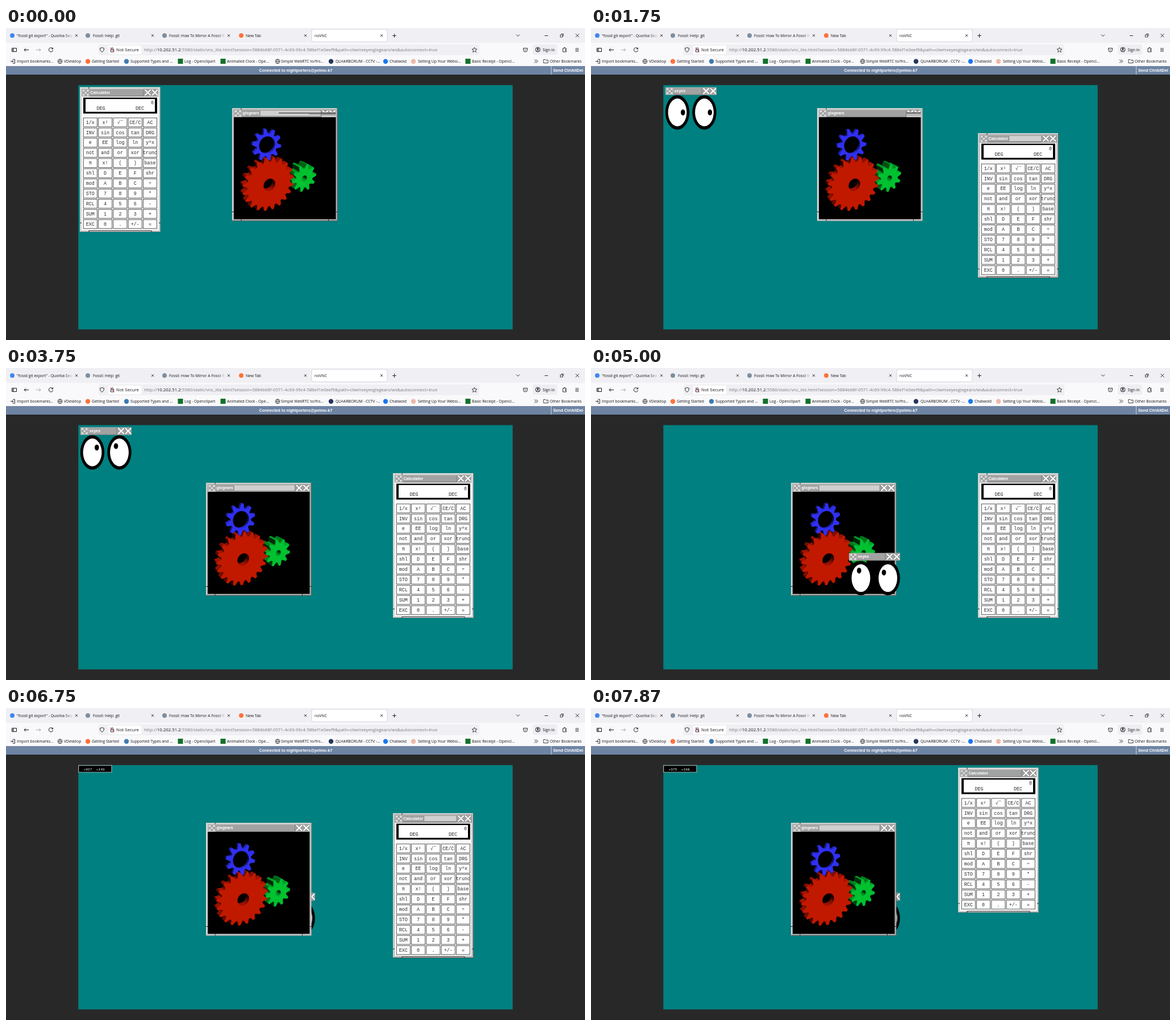
Recreate the animation shown at these times as an HTML page with a canvas. Size 1019 by 549 pixels, loop 8 s.

```html
<!DOCTYPE html>
<html lang="en">
<head>
<meta charset="utf-8">
<title>Remote desktop</title>
<style>
  html, body { margin: 0; width: 100%; height: 100%; overflow: hidden; background: #282828; }
  canvas { display: block; }
</style>
</head>
<body>
<canvas id="stage" width="1019" height="549"></canvas>
<script>
const ctx = document.getElementById('stage').getContext('2d');
const UI = '"Open Sans", "Noto Sans", sans-serif';
const ARIAL = '"Liberation Sans", Arial, sans-serif';
const MONO = '"Liberation Mono", monospace';
const INK = '#15141a';

// ---------- drawing helpers ----------
function box(x, y, w, h, color) {
  ctx.fillStyle = color;
  ctx.fillRect(x, y, w, h);
}
function rounded(x, y, w, h, r, color) {
  ctx.fillStyle = color;
  ctx.beginPath();
  ctx.roundRect(x, y, w, h, r);
  ctx.fill();
}
function oval(x, y, rx, ry, color) {
  ctx.fillStyle = color;
  ctx.beginPath();
  ctx.ellipse(x, y, rx, ry, 0, 0, 7);
  ctx.fill();
}
const disc = (x, y, r, color) => oval(x, y, r, r, color);
function draw(path, color = INK, width = 1, x = 0, y = 0) {
  ctx.save();
  ctx.translate(x, y);
  ctx.strokeStyle = color;
  ctx.lineWidth = width;
  ctx.stroke(new Path2D(path));
  ctx.restore();
}
function text(s, x, y, size, color = INK, font = UI, align = 'left', weight = '') {
  ctx.font = `${weight} ${size}px ${font}`;
  ctx.fillStyle = color;
  ctx.textAlign = align;
  ctx.fillText(s, x, y);
  return ctx.measureText(s).width;
}
function clipped(x, y, w, h, paint) {
  ctx.save();
  ctx.beginPath();
  ctx.rect(x, y, w, h);
  ctx.clip();
  paint();
  ctx.restore();
}
function lerpKeys(keys, k) {
  let i = 1;
  while (i < keys.length - 1 && keys[i][0] < k) i++;
  const [a, b] = [keys[i - 1], keys[i]];
  const p = Math.min(1, Math.max(0, (k - a[0]) / (b[0] - a[0])));
  return a.slice(1).map((v, j) => v + (b[j + 1] - v) * p);
}

// ---------- browser ----------
const CROSS = 'M-2,-2 L2,2 M2,-2 L-2,2';
const TABS = [
  [11, 19, 124, '"fossil git export" - Quorba Search', '#4285f4'],
  [144, 153, 258, 'Fossil: Help: git', '#7d8fa0'],
  [279, 287, 392, 'Fossil: How To Mirror A Fossil Repo', '#7d8fa0'],
  [414, 422, 527, 'New Tab', '#ff7139'],
  [0, 543, 661, 'noVNC']
];
const BOOKMARKS = [
  [12, 19, 'Import bookmarks...', 'import'], [95, 102, 'VDesktop', 'globe'],
  [144, 151, 'Getting Started', '#ff7139'], [212, 219, 'Supported Types and ...', '#3d7ab0'],
  [307, 314, 'Log - Openclipart', 'square'], [382, 389, 'Animated Clock - Ope...', 'square'],
  [478, 484, 'Simple WebRTC to/fro...', 'globe'], [572, 580, 'QLHARBORUM - CCTV -...', '#27365c'],
  [668, 675, 'Chatwold', '#1877f2'], [717, 725, 'Setting Up Your Websi...', '#f0b8a8'],
  [813, 820, 'Basic Receipt - Opencl...', 'square']
];

function drawTabs() {
  box(0, 0, 1019, 26, '#f0f0f4');
  rounded(537.5, 2, 134, 22.5, 3, '#d4d4dc');
  rounded(538.5, 2.8, 132, 21, 2.5, '#fff');
  for (const [icon, x, close, label, color] of TABS) {
    if (color) disc(icon, 13.3, 4, color);
    clipped(x, 0, close - 6 - x, 26, () => {
      text(label, x, 16, 6.8);
      if (label.length <= 25) return;
      const fade = ctx.createLinearGradient(close - 20, 0, close - 6, 0);
      fade.addColorStop(0, '#f0f0f400');
      fade.addColorStop(1, '#f0f0f4');
      box(close - 20, 4, 14, 18, fade);
    });
    draw(CROSS, INK, .9, close, 13.3);
  }
  draw('M-3.5,0 H3.5 M0,-3.5 V3.5', INK, .9, 683.5, 13.5);
  draw('M-3,-1.5 L0,1.5 L3,-1.5', INK, .9, 901, 13);
  draw('M-3,0 H3', INK, .9, 951, 13.5);
  draw('M-2.5,-1 H1.5 V3 H-2.5 Z M-1,-2.5 H3 V1.5', INK, .8, 978, 13);
  draw('M-3,-3 L3,3 M3,-3 L-3,3', INK, .9, 1005.5, 13.3);
}

function drawToolbar() {
  box(0, 26, 1019, 41, '#f9f9fb');
  draw('M-4,-3 H4 V3 H-4 Z M-1.5,-3 V3 M-3.5,0 H-1.5', INK, 1, 14.5, 38.5);
  draw('M4,0 H-4 M-1,-3 L-4,0 L-1,3', INK, 1, 36, 38.5);
  draw('M-4,0 H4 M1,-3 L4,0 L1,3', '#aaaab0', 1, 57, 38.5);
  draw('M3,-2.4 A3.7,3.7 0 1 0 3.7,.6 M3.6,-4 V-1.6 H1', INK, 1, 79, 38.5);
  rounded(163, 29, 670, 19, 3, '#f0f0f4');
  draw('M0,-4 L3.6,-2.8 Q3.8,2 0,4 Q-3.8,2 -3.6,-2.8 Z', INK, .9, 169, 38.5);
  rounded(180, 31, 58, 15, 2.5, '#fff');
  draw('M-2.6,-.5 H2.6 V3.5 H-2.6 Z M-1.7,-.5 V-2 A1.7,1.7 0 0 1 1.7,-2 V-.5', INK, .9, 187, 38.5);
  draw('M-3.5,-4 L3.5,4', '#d7264c', 1, 187, 38.5);
  text('Not Secure', 194, 41.4, 7.8);
  let x = 243;
  for (const [part, color] of [['http://', '#77777e'], ['10.202.51.2', INK],
    [':5580/static/vnc_lite.html?session=5884b68f-0571-4c69-99c4-586ef1e0eef9&path=ctwmxeyesglxgears/ws&autoconnect=true', '#77777e']])
    x += text(part, x, 41.4, 7.8, color);
  draw('M0,-4.5 L1.3,-1.5 L4.5,-1.3 L2,.8 L2.8,4 L0,2.2 L-2.8,4 L-2,.8 L-4.5,-1.3 L-1.3,-1.5 Z', INK, .8, 824.5, 38.5);
  draw('M-3.5,-3 H3.5 V0 A3.5,3.5 0 0 1 -3.5,0 Z M-1.8,-1 L0,.8 L1.8,-1', INK, .9, 914, 38.5);
  rounded(927, 29, 43, 18, 3, '#ededf2');
  draw('M-4,0 A4,4 0 1 0 4,0 A4,4 0 1 0 -4,0 M-2.5,3 Q0,-.5 2.5,3', INK, .9, 936, 38);
  disc(936, 36.8, 1.6, INK);
  text('Sign in', 944.5, 41, 6.9);
  draw('M-3,-2 H-1 V-3.5 H1 V-2 H3 V0 H1.5 V1.5 H3 V4 H-3 Z', INK, .9, 983, 38);
  draw('M-3,-2.5 H3 M-3,0 H3 M-3,2.5 H3', INK, .9, 1005, 38.5);
}

function drawBookmarks() {
  for (const [icon, x, label, kind] of BOOKMARKS) {
    if (kind === 'import') draw('M-4,0 H1 M-1,-2 L1,0 L-1,2 M0,-3.5 H3.5 V3.5 H0', INK, .9, icon, 58.7);
    else if (kind === 'globe') draw('M-4,0 A4,4 0 1 0 4,0 A4,4 0 1 0 -4,0 H4 M0,-4 Q-3.5,0 0,4 Q3.5,0 0,-4', '#333', .8, icon, 58.7);
    else if (kind === 'square') box(icon - 4.5, 54, 9, 9, '#12702a');
    else disc(icon, 58.7, 4.2, kind);
    text(label, x, 61.2, 6.8);
  }
  draw('M-3,-3 L0,0 L-3,3 M0,-3 L3,0 L0,3', INK, .9, 933, 58.5);
  draw('M-4,3 V-3 H-1 L0,-2 H4 V3 Z', INK, .8, 950, 58.5);
  text('Other Bookmarks', 957, 61.2, 6.8);
}

function drawPage() {
  box(0, 67, 1019, 15, '#6e84a3');
  text('Connected to nightporters@pelmo-k7', 510, 77.3, 7.2, '#fff', ARIAL, 'center', 'bold');
  box(959, 67, 1, 15, '#c8d2e0');
  text('Send CtrlAltDel', 963, 77.3, 7.2, '#fff', ARIAL, 'left', 'bold');
  box(0, 82, 1019, 467, '#282828');
  box(127.3, 100.5, 764.4, 429.8, '#008080');
}

// ---------- window decorations ----------
function titleButtons(x, y) {
  for (const dx of [6.5, 19]) for (const [color, width] of [['#777', 3.6], ['#fff', 2.4]])
    draw('M-5,-5 L5,5 M5,-5 L-5,5', color, width, x + dx, y + 6.5);
}
function titleBar(x, y, w, title, focused, torn) {
  box(x, y, w, 13.5, '#b4b4b4');
  for (let i = 0; i < 9; i++)
    box(x + 2.5 + (i % 3) * 3.6, y + 2 + Math.floor(i / 3) * 3.6, 2.4, 2.4, i % 2 ? '#999' : '#eee');
  const end = x + w - 25;
  box(x + 14, y + 1, end - x - 15, 11.5, '#a2a2a2');
  draw(`M${x + 14},${y + 12.8} H${end - 1} V${y + 1}`, '#686868', .8);
  const width = text(title, x + 15.5, y + 8.9, 7.1, '#fff', ARIAL, 'left', 'bold');
  if (focused) {
    box(x + 17 + width, y + 2, end - x - 18.5 - width, 9, '#d0d0d0');
    draw(`M${x + 17 + width},${y + 11} V${y + 2}`, '#777', .7);
  }
  box(end, y, 25, 13.5, '#a2a2a2');
  clipped(end, y, 25, torn ? 5 : 13.5, () => titleButtons(end, y));
  if (torn) {
    box(end, y + 5, 25, 8.5, '#c8c8c8');
    box(end, y + 5.5, 25, 1.2, '#222');
    box(end, y + 9, 25, .8, '#888');
  }
}
function frame(x, y, w, h, focused) {
  const [fill, bevel, edge] = focused ? ['#a0a0a0', '#d8d8d8', '#555'] : ['#e6e6e6', '#c4c4c4', '#8c8c8c'];
  box(x, y, w, h, fill);
  draw(`M${x + .5},${y + h} V${y + .5} H${x + w}`, '#dcdcdc');
  draw(`M${x + 1.8},${y + 1.8} H${x + w - 1.8} V${y + h - 1.8} H${x + 1.8} Z`, bevel);
  draw(`M${x + w - .5},${y} V${y + h - .5} H${x}`, edge);
  draw(`M${x + 16},${y} v3 M${x + 16},${y + h} v-3 M${x + w - 16},${y + h} v-3 M${x},${y + h - 16} h3 M${x + w},${y + h - 16} h-3`, '#222');
}

// ---------- calculator ----------
const KEYS = ['1/x x² √‾ CE/C AC', 'INV sin cos tan DRG', 'e EE log ln y^x', 'not and or xor trunc',
  'π x! ( ) base', 'shl D E F shr', 'mod A B C ÷', 'STO 7 8 9 *', 'RCL 4 5 6 -', 'SUM 1 2 3 +', 'EXC 0 . +/- ='];

function drawCalculator({ x, y }, focused) {
  frame(x, y, 142, 255, focused);
  titleBar(x + 3, y + 3, 135, 'Calculator', focused);
  box(x + 3, y + 17, 135.5, 234.5, '#fafafa');
  box(x + 6, y + 18.5, 130, 28, '#000');
  box(x + 10, y + 21, 122, 22.5, '#fff');
  const label = (s, cx, cy) => text(s, cx, cy + 2.6, 8.4, '#2a2a2a', MONO, 'center');
  label('0', x + 127.5, y + 27);
  label('DEG', x + 37, y + 37.5);
  label('DEC', x + 105.5, y + 37.5);
  KEYS.forEach((row, r) => row.split(' ').forEach((key, c) => {
    const cx = x + 18.3 + c * 26.3, cy = y + 62 + r * 17.9;
    box(cx - 12.5, cy - 8.3, 25, 16.6, '#444');
    box(cx - 11.6, cy - 7.4, 23.2, 14.8, '#fff');
    clipped(cx - 12.5, cy - 8, 25, 16, () => label(key, cx, cy));
  }));
  draw(`M${x + 16},${y + 252.5} H${x + 125}`, '#444');
}

// ---------- gears ----------
const RAD = Math.PI / 180;
const [CX, SX, CY, SY] = [Math.cos(20 * RAD), Math.sin(20 * RAD), Math.cos(30 * RAD), Math.sin(30 * RAD)];
const SLABS = [-1, -.5, -.25, .25, .5, 1];

function rotate([x, y, z]) {
  const depth = z * CY - x * SY;
  return [x * CY + z * SY, y * CX - depth * SX, y * SX + depth * CX];
}
function shade(rgb, normal) {
  const [x, y, z] = rotate(normal);
  const light = .2 + Math.max(0, (x + y + 2 * z) / Math.sqrt(6));
  return `rgb(${rgb.map(v => Math.min(255, v * light))})`;
}
function gear(x, y, inner, outer, half, teeth, rgb, turn) {
  const step = 90 / teeth, rim = [], hole = [];
  const at = (r, deg) => [x + r * Math.cos(deg * RAD), y + r * Math.sin(deg * RAD)];
  for (let i = 0; i < teeth; i++) {
    const a = turn + i * 4 * step;
    rim.push(at(outer - .35, a), at(outer + .35, a + step), at(outer + .35, a + 2 * step), at(outer - .35, a + 3 * step));
    hole.unshift(at(inner, a), at(inner, a - 2 * step));
  }
  const walls = [];
  for (const loop of [rim, hole]) loop.forEach((p, i) => {
    const q = loop[(i + 1) % loop.length];
    const len = Math.hypot(q[0] - p[0], q[1] - p[1]);
    const normal = [(q[1] - p[1]) / len, (p[0] - q[0]) / len, 0];
    if (rotate(normal)[2] > 0)
      walls.push({ p, q, color: shade(rgb, normal), near: rotate([...p, 0])[2] + rotate([...q, 0])[2] });
  });
  walls.sort((a, b) => a.near - b.near);
  return { rim, hole, half, walls, face: shade(rgb, [0, 0, 1]) };
}
function drawGears(cx, cy, angle) {
  const gears = [
    gear(3.1, -2, .5, 2, 1, 10, [0, 204, 51], -2 * angle - 9),
    gear(-3, -2, 1, 4, .5, 20, [204, 26, 0], angle),
    gear(-3.1, 4.2, 1.3, 2, .25, 10, [51, 51, 255], -2 * angle - 25)
  ];
  const fillLoops = (loops, color) => {
    ctx.beginPath();
    for (const loop of loops) {
      loop.forEach((point, i) => {
        const [x, y, z] = rotate(point), scale = 5 * 89.5 / (40 - z);
        ctx[i ? 'lineTo' : 'moveTo'](cx + x * scale, cy - y * scale);
      });
      ctx.closePath();
    }
    ctx.fillStyle = ctx.strokeStyle = color;
    ctx.lineWidth = .3;
    ctx.fill('evenodd');
    ctx.stroke();
  };
  // Paint slab by slab, from the back plane to the front one.
  for (let i = 1; i < SLABS.length; i++) {
    const [z0, z1] = [SLABS[i - 1], SLABS[i]];
    const present = gears.filter(g => g.half >= z1 && -g.half <= z0);
    for (const g of present) for (const { p, q, color } of g.walls)
      fillLoops([[[...p, z0], [...q, z0], [...q, z1], [...p, z1]]], color);
    for (const g of present) if (g.half === z1)
      fillLoops([g.rim, g.hole].map(loop => loop.map(p => [...p, z1])), g.face);
  }
}
function drawGearWindow({ x, y }, focused, k) {
  frame(x, y, 185.5, 198.5, focused);
  titleBar(x + 3, y + 2.5, 179.5, 'glxgears', focused, k < 20);
  if (k === 0) {
    box(x + 82, y + 8, 100, 1.2, '#333');
    box(x + 135, y + 10, 47, .8, '#666');
  }
  box(x + 3, y + 16, 179.5, 179.5, '#000');
  drawGears(x + 92.7, y + 105.6, lerpKeys(ANGLES, k)[0]);
}

// ---------- eyes ----------
function drawEyes({ x, y }, focused, k) {
  titleBar(x, y, 90, 'xeyes', focused);
  const [mx, my] = lerpKeys(POINTER, k);
  for (const cx of [x + 21, x + 68.5]) {
    const cy = y + 44.2;
    oval(cx, cy, 21.2, 30.2, '#000');
    oval(cx, cy, 16.4, 24.4, '#fff');
    const [dx, dy] = [mx - cx, my - cy];
    const reach = Math.min(1, 1 / Math.hypot(dx / 9.8, dy / 14));
    oval(cx + dx * reach, cy + dy * reach, 3.8, 5.2, '#000');
  }
}

// ---------- timeline, in steps of 125 ms ----------
const ANGLES = [[0, 18], [14, 140.5], [23, 216.75], [30, 276.5], [40, 365.5], [54, 486.75], [63, 566.25]];
const POINTER = [[0, 190, 113], [4, 740, 194], [14, 770, 150], [17, 470, 150], [20, 424, 211], [23, 560, 175],
  [30, 182, 116], [31, 182, 116], [34, 505, 332], [40, 451, 269], [46, 430, 211]];
const HOME = { calc: [130, 104], gears: [398, 141], eyes: [131, 104.3] };
const DRAGS = [
  ['calc', 1, 4, 681, 185], ['gears', 16, 20, 352, 202], ['eyes', 31, 34, 454, 325.5],
  ['calc', 54, 56, 646, 105], ['gears', 61, 64, 352, 202]
];

function drawReadout(x, y) {
  const signed = (v, origin) => '+' + Math.max(0, Math.round((v - origin) / .5965));
  box(127, 100.5, 59.5, 13, '#9aa');
  box(128.3, 101.7, 57, 10.8, '#000');
  text(`${signed(x, 128.2)}  ${signed(y, 101.5)}`, 136.5, 109.7, 6.2, '#fff', MONO);
}

function render(k) {
  drawTabs();
  drawToolbar();
  drawBookmarks();
  drawPage();

  const place = {};
  for (const name in HOME) place[name] = { x: HOME[name][0], y: HOME[name][1] };
  let readout = null;
  for (const [name, start, end, x, y] of DRAGS) {
    const from = place[name];
    if (k >= end) place[name] = { x, y };
    else if (k >= start) {
      const p = (k - start) / (end - start);
      readout = [from.x + (x - from.x) * p, from.y + (y - from.y) * p];
    }
  }
  const focus = (k >= 1 && k < 15) || (k >= 50 && k < 58) ? 'calc' : 'gears';
  const painters = { eyes: drawEyes, gears: drawGearWindow, calc: drawCalculator };
  const eyesOnTop = k >= 34 && k < 46;
  const order = eyesOnTop ? ['gears', 'calc', 'eyes'] : ['eyes', 'gears', 'calc'];
  for (const name of order) painters[name](place[name], focus === name, k);
  if (readout) drawReadout(...readout);
}

function tick() {
  const t = performance.now() % 8000;
  render(Math.min(63, Math.floor((t + 5) / 125)));
  requestAnimationFrame(tick);
}
tick();
</script>
</body>
</html>
```
